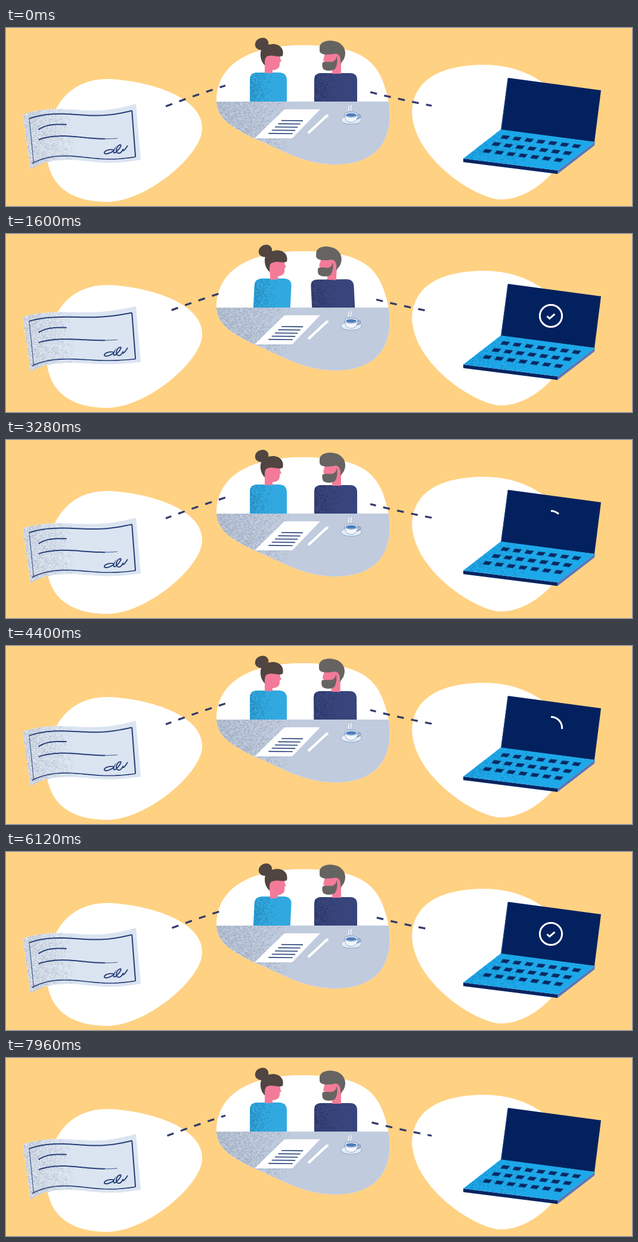
Write an HTML page with a canvas that moves like this. It is 1050 by 300 pixels and loops after 8 s.

```html
<!DOCTYPE html>
<html lang="en">
<head>
<meta charset="utf-8">
<title>Sign, meet, confirm</title>
<style>
html, body { margin: 0; width: 100%; height: 100%; overflow: hidden; background: #ffd182; }
canvas { display: block; }
</style>
</head>
<body>
<canvas id="stage" width="1050" height="300"></canvas>
<script>
const ctx = document.getElementById('stage').getContext('2d');
const LOOP = 8000, CYCLE = 4000;
const NAVY = '#04215f', INK = '#263f78', PINK = '#f37b99', TABLE = '#c0cbde';

let seed = 7;
const random = () => (seed = (seed * 16807) % 2147483647) / 2147483647;
const lerp = (a, b, p) => a + (b - a) * p;
const smooth = p => { p = Math.min(1, Math.max(0, p)); return p * p * (3 - 2 * p); };
const ease = (t, from, to) => smooth((t - from) / (to - from));
const pulse = (t, in0, in1, out0, out1) => ease(t, in0, in1) - ease(t, out0, out1);

function fill(shape, color) {
  ctx.fillStyle = color;
  ctx.fill(typeof shape === 'string' ? new Path2D(shape) : shape);
}
function stroke(shape, color, width) {
  ctx.strokeStyle = color;
  ctx.lineWidth = width;
  ctx.stroke(typeof shape === 'string' ? new Path2D(shape) : shape);
}
function within(shape, draw) {
  ctx.save();
  ctx.clip(shape);
  draw();
  ctx.restore();
}

// Random 0..1 whose density fades out linearly towards 1
const fading = () => 1 - Math.sqrt(1 - random());

function grain(count, x, y, w, h) {
  const path = new Path2D();
  for (let i = 0; i < count; i++) path.rect(x + w * fading(), y + h * random(), 1, 1);
  return path;
}

const blobs = {
  left: new Path2D('M168 86C215 86 330 108 329 170C328 215 235 293 170 293C100 293 68 258 68 205C68 150 95 87 168 86Z'),
  middle: new Path2D('M353 122C354 60 410 29 497 29C595 29 624 54 638 108C652 160 645 230 551 230C495 230 450 198 418 187C385 170 353 155 353 122Z'),
  right: new Path2D('M681 140C683 90 725 62 803 62C865 62 935 95 950 170C950 220 890 289 830 289C790 289 681 220 681 140Z')
};
const womanBody = new Path2D('M409 126V87Q409 76 420 75H459Q471 76 471 88V126Z');
const manBody = new Path2D('M517 126V87Q517 76 529 76H577Q589 76 589 88V126Z');
const keyboard = new Path2D('M830 171L988 192L925 240L767 220Z');

const tableGrain = grain(3000, 353, 124, 130, 80);
const womanGrain = grain(420, 409, 76, 38, 50);
const manGrain = grain(420, 517, 76, 42, 50);
const keyGrain = grain(800, 767, 171, 120, 58);
const sheetGrain = Array.from({ length: 1900 }, () => [0.43 * fading(), random()]);

function drawSheet(t) {
  const lift = t < 1250 ? lerp(0, -8, ease(t, 0, 1250))
    : t < 2750 ? lerp(-8, 5, ease(t, 1250, 2750))
    : lerp(5, 0, ease(t, 2750, CYCLE));
  const swell = 4 - 2 * Math.abs(lift) / 8;
  const point = (u, v) => [
    28 + 190 * u + v * (13 - 5 * u),
    lift + lerp(140, 128, u) + v * lerp(86, 94, u)
      - swell * Math.sin(2 * Math.PI * u)
      + 4 * (1 - v) * Math.sin(Math.PI * u)
      + (6 + 6 * v) * Math.exp(-8 * u)
  ];
  const trace = (path, u0, v0, u1, v1, droop = 0) => {
    for (let i = 0; i <= 30; i++) {
      const p = i / 30;
      path.lineTo(...point(lerp(u0, u1, p), lerp(v0, v1, p) + droop * (1 - p) ** 4));
    }
  };
  const outline = (l, top, r, bottom) => {
    const path = new Path2D();
    trace(path, l, top, r, top);
    trace(path, r, bottom, l, bottom);
    path.closePath();
    return path;
  };
  const line = (width, ...ends) => {
    const path = new Path2D();
    trace(path, ...ends);
    stroke(path, INK, width);
  };

  fill(outline(0, 0, 1, 1), '#dbe4f1');
  const dots = new Path2D();
  for (const [u, v] of sheetGrain) {
    const [x, y] = point(u, v);
    dots.rect(x, y, 1, 1);
  }
  fill(dots, '#b1b8c5');
  line(2, 0.05, 0.09, 0.96, 0.1, 0.02);
  line(1, 0.05, 0.11, 0.035, 0.92);
  line(2, 0.96, 0.1, 0.955, 0.935);
  line(1.6, 0.02, 0.92, 0.955, 0.935);
  line(2, 0.115, 0.3, 0.37, 0.305, 0.06);
  line(2, 0.105, 0.52, 0.7, 0.545, 0.025);
  line(1, 0.7, 0.545, 0.81, 0.55);
  ctx.save();
  ctx.translate(0, lift);
  stroke('M181 206C176 203 163 207 165 211C168 214 179 209 181 206C179 211 182 212 186 208C192 202 195 196 191 197C185 199 182 211 189 211C194 211 195 206 196 205C196 209 199 206 204 198', INK, 1.9);
  ctx.restore();
}

function drawWoman(t) {
  const lean = pulse(t, 960, 1400, 2850, 3250);
  const nod = pulse(t, 1500, 2100, 2250, 2800);
  ctx.save();
  ctx.transform(1, 0, -0.05 * lean, 1, 12 * lean, 0);
  fill(womanBody, '#31a9e0');
  within(womanBody, () => fill(womanGrain, '#247fae'));
  ctx.restore();

  ctx.save();
  ctx.translate(445 + 7.5 * lean, 50 + 0.5 * lean + 1.2 * nod);
  ctx.rotate(-0.07 * lean);
  ctx.translate(-445, -50);
  fill('M434 46H460L460 52L462 56L459 58C460 66 456 71 447 71V76H434Z', PINK);
  fill('M440 28A11.5 10 -25 1 0 428 37C425 47 428 57 434 63C434 53 434 48 441 47C448 45 456 50 464 47C467 37 461 27 447 27Z', '#504540');
  ctx.restore();
}

function drawMan(t) {
  const lean = pulse(t, 240, 860, 1560, 2100);
  ctx.save();
  ctx.transform(1, 0.01 * -lean, 0.05 * lean, 1, -10 * lean, 6 * lean);
  fill(manBody, '#38457c');
  within(manBody, () => fill(manGrain, '#28315d'));
  ctx.restore();

  ctx.save();
  ctx.translate(548 - 6.2 * lean, 40);
  ctx.rotate(0.06 * lean);
  ctx.translate(-548, -40);
  fill('M535 42H562V77H547V66H534V56L532 55Z', PINK);
  fill('M526 32C527 22 543 18 557 24C570 31 571 43 567 52L561 61C562 51 560 44 553 43C545 45 526 47 526 38Z', '#666462');
  fill('M531 58C536 56 542 58 547 57C552 56 554 52 555 47C556 56 556 62 552 69C547 73 536 73 532 69C530 65 530 61 531 58Z', '#666462');
  ctx.restore();
}

function drawTable() {
  within(blobs.middle, () => {
    ctx.fillStyle = TABLE;
    ctx.fillRect(350, 124, 300, 110);
    fill(tableGrain, '#98a4b8');
    fill('M467 137H527L480 186H417Z', '#fff');
    for (let i = 0; i < 5; i++) {
      const y = 156 + 5.4 * i;
      stroke(`M${462 - 5.4 * i} ${y}L${498 - 4.3 * i} ${y + 0.4}`, INK, 1.6);
    }
  });
  stroke('M507 177L538 148', '#a9b8d0', 6);
  stroke('M507 177L538 148', '#fff', 4.6);
  fill('M535 147L541 145L540 151Z', '#f4f7fb');

  const ellipse = (x, y, rx, ry, color, edge) => {
    const path = new Path2D();
    path.ellipse(x, y, rx, ry, 0, 0, 7);
    fill(path, color);
    if (edge) stroke(path, edge, 1);
  };
  ellipse(579, 155, 17.5, 7.2, '#e3ecf6', '#8ba2c3');
  stroke('M588 147C597 144 596 153 587 153', '#8ba2c3', 2.4);
  fill('M568 146C568 154 573 159 579 159C585 159 590 154 590 146Z', '#f3f7fc');
  stroke('M568 146C568 154 573 159 579 159C585 159 590 154 590 146', '#7994bb', 0.8);
  ellipse(579, 146, 11, 4.4, '#f7faff', '#7994bb');
  ellipse(579, 146.5, 9, 3, '#4b7dbd');
  stroke('M575 139C572 136 577 134 575 131M579 139C576 136 581 133 579 130', '#fff', 1.2);
}

function drawLaptop(t) {
  fill('M842 84L998 105L987 192L830 172Z', NAVY);
  stroke('M842 85L831 171', '#20437e', 1.2);
  fill('M767 220L925 240V246L767 226Z', '#082461');
  fill('M988 192L987 198L925 246V240Z', '#5577bf');
  fill(keyboard, '#1da8e9');
  within(keyboard, () => fill(keyGrain, '#147eb8'));
  for (let row = 0; row < 3; row++) {
    for (let col = 0; col < 7; col++) {
      const x = 837.5 - 15 * row + 19.9 * col, y = 184 + 11.7 * row + 2.5 * col;
      const key = new Path2D(`M${x - 4} ${y - 3.5}L${x + 8} ${y - 2}L${x + 3} ${y + 3.5}L${x - 8} ${y + 2}Z`);
      fill(key, '#092963');
      stroke(key, '#1a689f', 0.7);
    }
  }

  const ring = pulse(t, 70, 1050, 2750, 3430);
  if (ring > 0) {
    const path = new Path2D();
    path.arc(914, 138, 18.6, -Math.PI / 2, -Math.PI / 2 + 2 * Math.PI * ring);
    stroke(path, '#fff', 3);
  }
  const tick = pulse(t, 1000, 1400, 2800, 3200);
  if (tick > 0) {
    ctx.setLineDash([18 * tick, 100]);
    stroke('M907.5 138.5L911.7 142.5L920.5 134.8', '#fff', 3);
    ctx.setLineDash([]);
  }
}

function drawDashes(time) {
  const period = 24;
  ctx.setLineDash([11.5, period - 11.5]);
  ctx.lineDashOffset = -(time % 1120) / 1120 * period;
  stroke('M268 132Q318 113 368 97', '#333b6b', 3.3);
  stroke('M611 108Q662 121 714 131', '#333b6b', 3.3);
  ctx.setLineDash([]);
  ctx.lineDashOffset = 0;
}

function draw(now) {
  const time = now % LOOP, t = time % CYCLE;
  ctx.fillStyle = '#ffd182';
  ctx.fillRect(0, 0, 1050, 300);
  for (const name in blobs) fill(blobs[name], '#fff');
  drawSheet(t);
  drawWoman(t);
  drawMan(t);
  drawTable();
  drawLaptop(t);
  drawDashes(time);
}

const start = performance.now();
function tick() {
  draw(performance.now() - start);
  requestAnimationFrame(tick);
}
tick();
</script>
</body>
</html>
```
